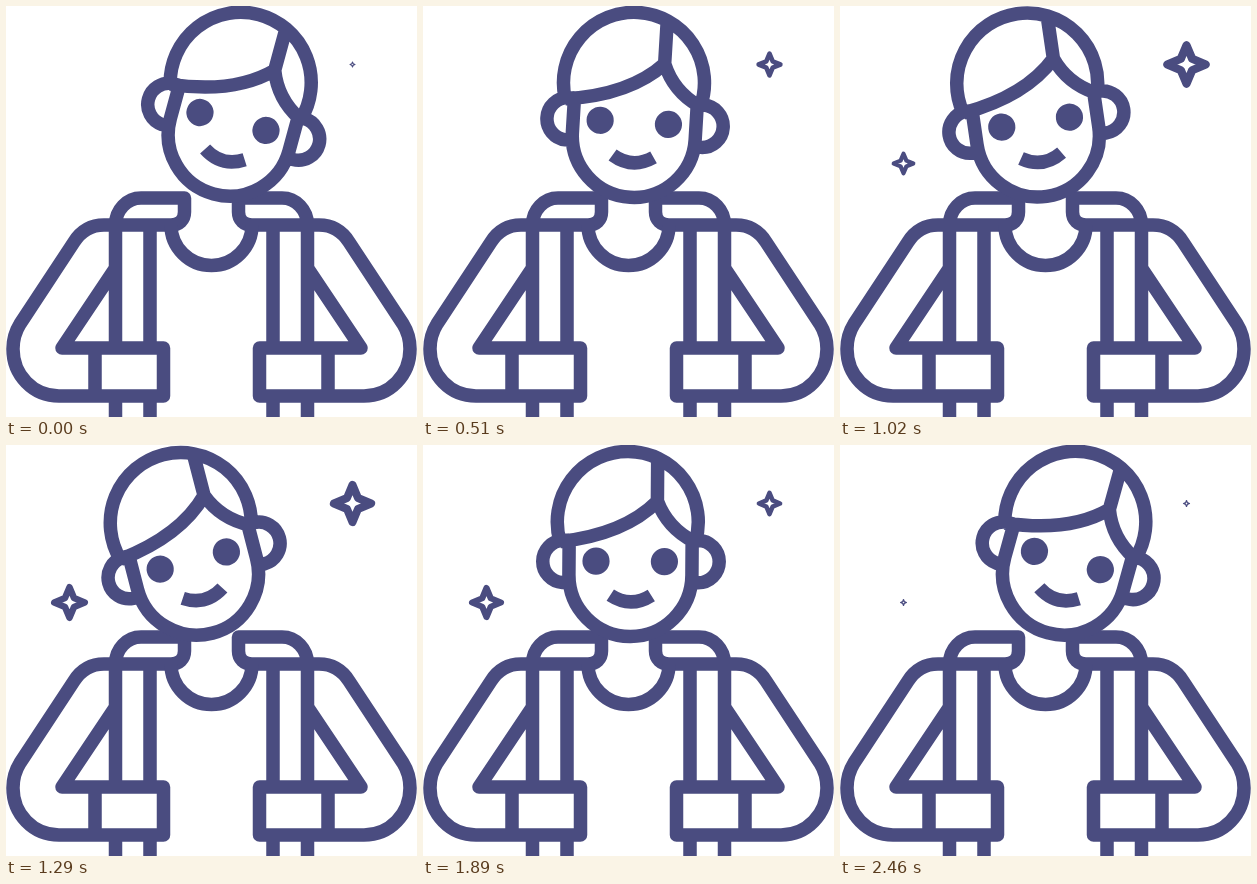
Recreate the animation shown at these times as an HTML page with a canvas. Size 411x411 px, loop 2490 ms.

```html
<!DOCTYPE html>
<html lang="en">
<head>
<meta charset="utf-8">
<title>Nodding traveller</title>
<style>
  html, body { margin: 0; width: 100%; height: 100%; overflow: hidden; background: #fff; }
  canvas { display: block; width: 411px; height: 411px; }
</style>
</head>
<body>
<canvas id="stage"></canvas>
<script>
const SIZE = 411, LOOP = 2490, STEP = 30;
const INK = '#4a4c80', LINE = 13.5;

const canvas = document.getElementById('stage');
const ratio = window.devicePixelRatio || 1;
canvas.width = canvas.height = Math.round(SIZE * ratio);
const ctx = canvas.getContext('2d');

// One half of the body; the other half is its mirror image.
const bodyHalf = new Path2D(`
  M109.5 219 H98 C84 219 75 225 68 236 L14 318 C9 326 7 334 7 343
  C7 369 27 390 53 390 H157.5 V342 H56 L109.5 262
  M89 342 V390
  M109.5 411 V390 M144 411 V390
  M109.5 342 V219 C109.5 204 121 192 135 192 H178.5 V206
  C178.5 214 173 219 165 219 H109.5
  M144 219 V342`);
const neckline = new Path2D('M165 219 A40.5 40.5 0 0 0 246 219');

const headLines = new Path2D(`
  M136.4 97 A70.5 70.5 0 1 1 271.6 97
  M136.4 97 C178 92 210 80 233.5 56 V14
  M233.5 56 C240 73 252 87 270 96
  M145.5 97 V130 A61.5 61.5 0 0 0 268.5 130 V95
  M145 95.7 H139 A21.2 21.2 0 0 0 139 138 H145.5
  M269 95 H274.5 A21.2 21.2 0 0 1 274.5 137.4 H268.5`);
const mouth = new Path2D('M187 150.3 Q207.5 163.5 228 150.3');

const star = new Path2D();
for (let i = 0; i < 8; i++) {
  const r = i % 2 ? 6.2 * Math.SQRT2 : 21;
  star.lineTo(r * Math.cos(i * Math.PI / 4), r * Math.sin(i * Math.PI / 4));
}
star.closePath();
const STAR_HALF = 25.5;

// Linear interpolation through [time, value] pairs.
function track(keys, t) {
  for (let i = 1; i < keys.length; i++) {
    const [t0, v0] = keys[i - 1], [t1, v1] = keys[i];
    if (t <= t1) return v0 + (v1 - v0) * (t - t0) / (t1 - t0);
  }
  return keys[keys.length - 1][1];
}

const tilt = [[0, 15.2], [1310, -15], [2460, 15.5], [2490, 15.3]];
const rightStar = [[0, 3], [1120, 25.4], [2490, 3.1]];
const leftStar = [[650, 2.8], [1570, 25.4], [2490, 2.8]];

function drawBody() {
  ctx.stroke(bodyHalf);
  ctx.save();
  ctx.translate(SIZE, 0);
  ctx.scale(-1, 1);
  ctx.stroke(bodyHalf);
  ctx.restore();
  ctx.stroke(neckline);
}

function drawHead(degrees) {
  const cx = 206.7, cy = 116.4;
  ctx.save();
  ctx.translate(cx + degrees * 1.335, cy - 0.9 * (degrees / 15) ** 2);
  ctx.rotate(degrees * Math.PI / 180);
  ctx.translate(-cx, -cy);
  ctx.stroke(headLines);
  ctx.stroke(mouth);
  for (const side of [-1, 1]) {
    ctx.beginPath();
    ctx.arc(cx + side * 34.2, cy, 13.6, 0, Math.PI * 2);
    ctx.fill();
  }
  ctx.restore();
}

function drawStar(x, y, half) {
  ctx.save();
  ctx.translate(x, y);
  ctx.scale(half / STAR_HALF, half / STAR_HALF);
  ctx.lineWidth = 9;
  ctx.stroke(star);
  ctx.restore();
}

function draw(t) {
  ctx.setTransform(ratio, 0, 0, ratio, 0, 0);
  ctx.fillStyle = '#fff';
  ctx.fillRect(0, 0, SIZE, SIZE);
  ctx.fillStyle = ctx.strokeStyle = INK;
  ctx.lineWidth = LINE;
  ctx.lineJoin = 'round';
  drawBody();
  drawHead(track(tilt, t));
  drawStar(346.5, 58.5, track(rightStar, t));
  if (t >= leftStar[0][0]) drawStar(63.5, 157.5, track(leftStar, t));
}

const start = performance.now();
function tick() {
  const t = (performance.now() - start) % LOOP;
  draw(Math.floor(t / STEP) * STEP);
  requestAnimationFrame(tick);
}
tick();
</script>
</body>
</html>
```
